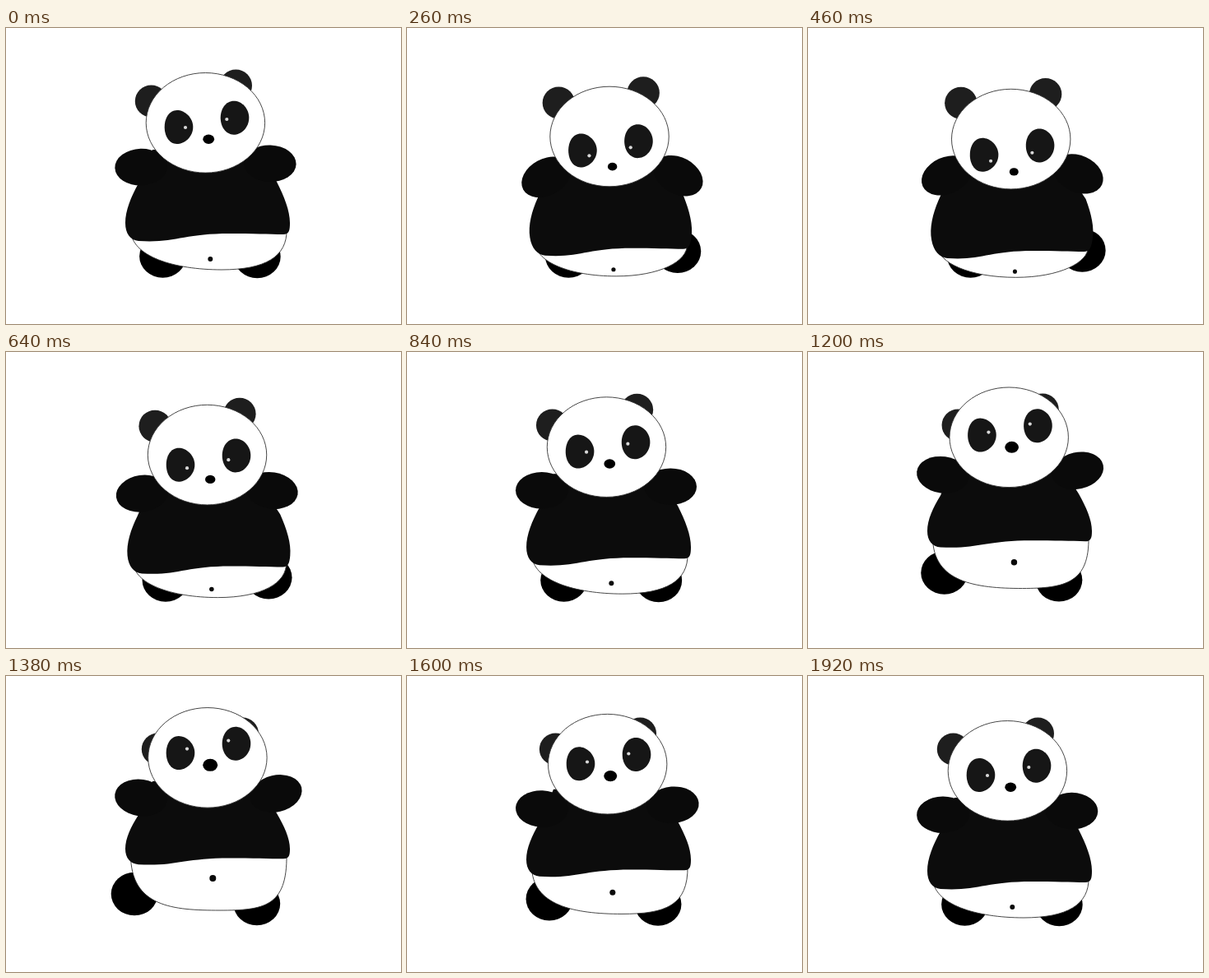
An HTML page with a canvas for the animation above (1940 ms loop, 480x360 px).

```html
<!DOCTYPE html>
<html lang="en">
<head>
<meta charset="utf-8">
<title>Bouncing panda</title>
<style>
  html, body { margin: 0; width: 100%; height: 100%; overflow: hidden; background: #fff; }
  canvas { display: block; }
</style>
</head>
<body>
<canvas id="stage" width="480" height="360"></canvas>
<script>
const ctx = document.getElementById('stage').getContext('2d');
const LOOP = 1940, STEP = 20, ARM_LEAD = 60;
const MIDDLE = 245, ARMPIT = 188;

// Smooth rise to 1 at the peak, smooth fall back to 0.
function swell(t, start, peak, end) {
  if (t <= start || t >= end) return 0;
  const k = t < peak ? (t - start) / (peak - start) : (end - t) / (end - peak);
  return Math.sin(k * Math.PI / 2) ** 2;
}

const poseAt = t => ({
  squat: 1.25 * swell(t, 0, 375, 880),
  stretch: swell(t, 900, 1365, 1840)
});

const shift = (pose, rest, low, high) => rest + pose.squat * low + pose.stretch * high;

function paint(fill, line) {
  ctx.fillStyle = fill;
  ctx.fill();
  if (line) {
    ctx.strokeStyle = '#333';
    ctx.lineWidth = 0.9;
    ctx.stroke();
  }
}

function oval(fill, x, y, rx, ry, tilt = 0, line = false) {
  ctx.beginPath();
  ctx.ellipse(x, y, rx, ry, tilt, 0, Math.PI * 2);
  paint(fill, line);
}

// The trunk sinks as a whole and straightens its sides; stretching lifts the hem most.
function warp(pose, x, y) {
  const side = (x - MIDDLE) / 95, below = Math.max(0, y - ARMPIT);
  return [
    shift(pose, x, 2.5 + side * (5.5 - 0.15 * below), 0),
    shift(pose, y, 18, -20 - 0.14 * below)
  ];
}

function foot(pose, x, y, low, high) {
  oval('#000', shift(pose, x, low[0], high[0]), shift(pose, y, low[1], high[1]), 28.4, 26.3);
}

function belly(pose) {
  const left = warp(pose, 151.5, 245), right = warp(pose, 341, 245);
  const floor = shift(pose, 294, 8, -9), flank = shift(pose, 278, 6, 3);
  const cx = shift(pose, 262, -8, -2);
  ctx.beginPath();
  ctx.moveTo(...left);
  ctx.bezierCurveTo(left[0], flank, cx - 57, floor, cx, floor);
  ctx.bezierCurveTo(cx + 53, floor, right[0] + 1, flank, ...right);
  paint('#fff', true);
  const r = shift(pose, 3, -0.4, 1);
  oval('#0a0a0a', shift(pose, 248.3, 2.7, 3), shift(pose, 281, 13, -35), r, r);
}

function trunk(pose) {
  const at = (x, y) => warp(pose, x, y);
  const curve = (a, b, c) => ctx.bezierCurveTo(...at(...a), ...at(...b), ...at(...c));
  ctx.beginPath();
  ctx.moveTo(...at(161, 189));
  curve([152, 205], [145, 222], [145, 237]);
  curve([145, 250], [151, 258], [161, 259]);
  curve([205, 262], [215, 250], [272, 250]);
  curve([300, 250], [320, 251], [337, 251]);
  curve([344, 251], [345, 246], [345, 237]);
  curve([345, 222], [338, 205], [329, 187]);
  ctx.lineTo(...at(303, 146));
  ctx.lineTo(...at(178, 148));
  paint('#0c0c0c');
}

function arm(pose, x, y, low, high, lowTilt, highTilt) {
  oval('#0a0a0a', shift(pose, x, low[0], high[0]), shift(pose, y, low[1], high[1]),
    31.8, 22.3, shift(pose, 0, lowTilt, highTilt));
}

function ear(pose, x, y, drop) {
  oval('#1e1e1e', shift(pose, x, 8, 8), shift(pose, y, drop, 0), 19.7, 19.5);
}

// Face parts drift together; each nods by its own amount.
const face = (pose, x, y, low, high) => [shift(pose, x, 3.5, 2), shift(pose, y, low, high)];

function eye(pose, x, y, lean, glintX, glintY) {
  const [cx, cy] = face(pose, x, y, 29, -27);
  ctx.beginPath();
  for (let a = 0; a < Math.PI * 2; a += 0.1) {
    const s = Math.sin(a);
    ctx.lineTo(cx + 17.3 * Math.cos(a) + lean * s * s, cy + 20.5 * s);
  }
  ctx.closePath();
  paint('#161616');
  oval('#d8d8d8', ...face(pose, glintX, glintY, 35, -32.5), 2.1, 2.1);
}

function draw(t) {
  const pose = poseAt(t), swing = poseAt((t + ARM_LEAD) % LOOP);
  ctx.fillStyle = '#fff';
  ctx.fillRect(0, 0, 480, 360);

  foot(pose, 190.5, 277.5, [6, 0], [-34.5, -12.5]);
  foot(pose, 305.3, 278, [24, -6.5], [-0.5, -1]);
  belly(pose);
  trunk(pose);
  arm(swing, 163.8, 168.3, [4.5, 11], [0, -21.5], -0.42, 0.15);
  arm(swing, 320.2, 163.7, [8, 13.5], [8.5, -22], 0.42, -0.25);

  ear(pose, 176.5, 89, 2);
  ear(pose, 279.3, 70, 9);
  oval('#fff', shift(pose, 242.4, 3.7, 2.5), shift(pose, 115.3, 17, -16), 72.2, 60.8, 0, true);
  eye(pose, 210, 120.5, -2, 218, 121);
  eye(pose, 278, 109.2, -1, 268.3, 111);
  oval('#000', ...face(pose, 246.2, 135.3, 34, -27),
    shift(pose, 6.9, -1.2, 2.1), shift(pose, 5.7, -0.9, 1.8));
}

const began = performance.now();
function tick() {
  const t = (performance.now() - began) % LOOP;
  draw(Math.floor(t / STEP) * STEP);
  requestAnimationFrame(tick);
}
tick();
</script>
</body>
</html>
```
